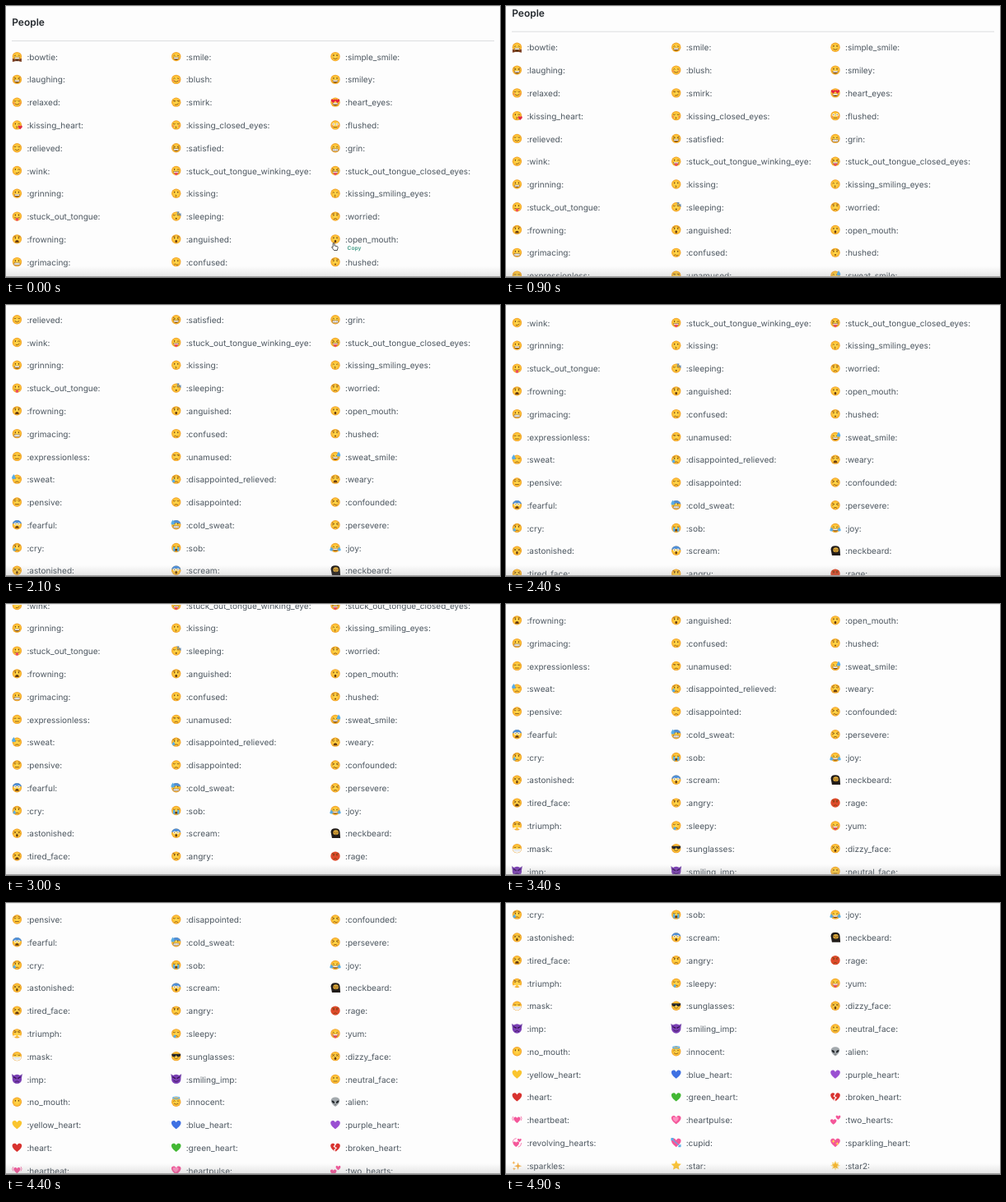
Animation of 600x330 px, one loop 5 s. Source, as an HTML page:

```html
<!DOCTYPE html>
<html lang="en">
<head>
<meta charset="utf-8">
<title>Emoji list</title>
<style>
  html, body { margin: 0; width: 100%; height: 100%; overflow: hidden; background: #fdfdfd; }
  svg { display: block; width: 600px; height: 330px; font: 10.06px Inter, sans-serif; text-rendering: geometricPrecision; }
  text { fill: #4c565f; }
  .title { font-size: 12px; font-weight: 600; fill: #24292e; }
  .copy { font-size: 6.6px; font-weight: 600; fill: #3f9a85; }
  .icon { fill: none; stroke: #74430f; stroke-width: 1.3; stroke-linecap: round; stroke-linejoin: round; }
</style>
</head>
<body>
<svg viewBox="0 0 600 330">
  <defs>
    <radialGradient id="skin">
      <stop offset=".2" stop-color="#ffd54a"/><stop offset=".75" stop-color="#fdc035"/><stop offset="1" stop-color="#ee9a24"/>
    </radialGradient>
    <linearGradient id="shade" x2="0" y2="1">
      <stop stop-color="#888" stop-opacity="0"/><stop offset="1" stop-color="#888" stop-opacity=".2"/>
    </linearGradient>
  </defs>
  <g id="page">
    <text class="title" x="7.2" y="24.2">People</text>
    <path d="M7 42.5H593" stroke="#dcdee0"/>
  </g>
  <g id="pointer">
    <text class="copy" x="414.6" y="297.4">Copy</text>
    <path d="M397.2 292.5v-3.6q.9-1.4 1.8 0v3l3.4 .9q1 .4 .7 1.6l-.8 3.1h-3.9l-2.7-3.6q.2-1.4 1.5-.4z"
      fill="#fff" stroke="#222" stroke-width=".8"/>
  </g>
  <path d="M0 .5H600" stroke="#ececec"/>
  <path d="M0 317H600V329H0z" fill="url(#shade)"/>
  <path d="M0 329.5H600" stroke="#a2a2a2"/>
</svg>
<script>
const ROW = 27.78, TOP = 62, COL = 193.3, LOOP = 5000, STEP = 100;
const BROWN = '#6b3d10', PINK = '#f4579a', BLUE = '#5aaee6';

const line = (d, attrs = '') => `<path d="${d}" ${attrs}/>`;
const shape = (d, color) => line(d, `fill="${color}" stroke="none"`);
const oval = (x, y, rx, ry, color) =>
  `<ellipse cx="${x}" cy="${y}" rx="${rx}" ry="${ry}" fill="${color}" stroke="none"/>`;
const pair = (x, y, rx, ry, color) => oval(-x, y, rx, ry, color) + oval(x, y, rx, ry, color);
const at = (x, y, size, body) => `<g transform="translate(${x} ${y}) scale(${size})">${body}</g>`;
const heart = (color, x = 0, y = 0, size = 1) =>
  at(x, y, size, shape('M0 9C-5 5-10 1-10-4C-10-9-3-11 0-5C3-11 10-9 10-4C10 1 5 5 0 9z', color));
const drop = (x, y, size = 1) => at(x, y, size, shape('M0-4q6 8 0 8t0-8z', BLUE));

function star(color, points, inner, x = 0, y = 0, size = 10) {
  let d = '';
  for (let i = 0; i < points * 2; i++) {
    const r = i % 2 ? size * inner : size, a = i * Math.PI / points;
    d += `${i ? 'L' : 'M'}${(x + r * Math.sin(a)).toFixed(2)} ${(y - r * Math.cos(a)).toFixed(2)}`;
  }
  return shape(d + 'z', color);
}

const face = (color = 'url(#skin)') => oval(0, 0, 9.8, 9.8, color);
const grin = shape('M-6 1.5h12q-.8 5.5-6 5.5t-6-5.5z', BROWN) + shape('M-5.2 2h10.4l-1 2.6h-8.4z', '#fff');
const tongue = shape('M-2.8 4h5.6v3.5q-2.8 4.5-5.6 0z', '#ef4a63');

// One character per feature: eyes, mouth, then extras.
const parts = {
  o: pair(3.5, -2.5, 1.1, 1.8, BROWN),
  '^': line('M-5.5-1.5q1.7-3 3.4 0M2.1-1.5q1.7-3 3.4 0'),
  u: line('M-6-2.5q2 2 4 0M2-2.5q2 2 4 0'),
  w: oval(-3.5, -2.5, 1.1, 1.8, BROWN) + line('M2-2q2-2.5 4 0'),
  '-': line('M-6-2h4M2-2h4'),
  s: line('M-6-3h4M2-3h4M-2.8-2v.8M5.2-2v.8'),
  x: line('M-6-4l4 2-4 2M6-4l-4 2 4 2'),
  X: line('M-6-4l4 4m0-4l-4 4M2-4l4 4m0-4l-4 4'),
  e: pair(3.7, -2, 2.6, 2.8, '#fff') + pair(3.7, -2, 1, 1.1, BROWN),
  h: heart('#e5253c', -4.5, -2.5, .45) + heart('#e5253c', 4.5, -2.5, .45),
  g: shape('M-9.5-5h19q0 6.5-5 6.5q-3.5 0-4.5-4q-1 4-4.5 4q-5 0-5-6.5z', '#26262a'),
  D: grin,
  m: line('M-4 3.6q4 3.4 8 0'),
  f: line('M-3.2 5.8q3.2-3 6.4 0'),
  _: line('M-3.5 4.5h7'),
  '.': oval(0, 4.8, 1.5, 1.7, BROWN),
  O: oval(0, 4.4, 2.3, 3, BROWN),
  T: grin + tongue,
  l: line('M-5 3q5 2 10 0') + tongue,
  G: line('M-5.5 2h11q1.5 2.4 0 4.8h-11q-1.5-2.4 0-4.8z', 'fill="#fff" stroke-width=".8"') +
     line('M-6 4.4h12M-2.5 2v5M2.5 2v5', 'stroke="#999" stroke-width=".6"'),
  k: line('M-1 2.8q2.8 .9 0 1.9q2.8 .9 0 1.9'),
  S: line('M-2 5.5q5 0 6.5-2.5'),
  z: line('M-4 5.5q2-2.5 4 0t4 0'),
  W: shape('M-4 7q0-5 4-5t4 5z', BROWN),
  b: pair(6.2, 2.2, 2, 1.5, '#f5845a'),
  t: drop(-5.5, 3),
  q: shape('M-6.5-1h4v9.5l-4-2zM2.5-1h4v7.5l-4 2z', BLUE),
  j: drop(-8.2, 2.5, 1.1) + drop(8.2, 2.5, 1.1),
  d: drop(-7, -5.5, 1.3),
  c: drop(7, -5, 1.3),
  B: shape('M-9.6-2A9.8 9.8 0 0 1 9.6-2Q0-6-9.6-2z', '#4f8fd8'),
  v: heart('#e02a41', 6.5, 5, .45),
  Z: line('M2-9h4l-4 4h4M7-5h3l-3 3h3', 'stroke="#3a78bd"'),
  N: oval(-3, 6, 2.6, 3.2, BLUE),
  H: line('M-7-8.5a7 2.2 0 1 1 14 0a7 2.2 0 1 1-14 0z', `stroke="${BLUE}" stroke-width="2"`),
  M: shape('M-9 0Q0 3 9 0Q9 8 0 9.4Q-9 8-9 0z', '#f3f5f7') + line('M-6 4h12', 'stroke="#c9d0d6" stroke-width="1"'),
  n: shape('M-1 4q-8-1-9 4q5 3 9-4zM1 4q8-1 9 4q-5 3-9-4z', '#fff3df'),
  r: line('M-6.5-6l4.5 2M6.5-6L2-4'),
  a: line('M-6.5-4.8l4-1.6M6.5-4.8l-4-1.6', 'stroke-width="1"'),
  y: shape('M0 7.5L-9.5 3.6v7.6L0 8.8L9.5 11.2V3.6z', '#7a3d20') + oval(0, 7.8, 1.8, 1.8, '#3c2a22')
};

const devil = mouth => shape('M-9.5-1L-11-11Q-8-7-3-8zM9.5-1L11-11Q8-7 3-8z', '#6a36a3') + face('#7b3fb4') +
  line('M-6.5-4l4.5 2.5M6.5-4L2-1.5', 'stroke="#32104f" stroke-width="2.2"') +
  line(mouth, 'stroke="#32104f"');

const special = {
  imp: devil('M-4 6q4-4 8 0'),
  smiling_imp: devil('M-5 3q5 5 10 0'),
  rage: face('#dd4a2a') + parts.r + parts.o + parts.f,
  neckbeard: shape('M-9.5-3Q-9-10.5 0-10.5Q9-10.5 9.5-3L10.5 10H-7Q-8 4-9.5-3z', '#211c19') +
    oval(1, -1.8, 5.8, 5, '#dfae3c') + line('M-4-2.2h4M2-2.2h4M-1 1.5h4') +
    shape('M-4.5 3q5.5 3.5 11 0q-1 5-5.5 5t-5.5-5z', '#211c19'),
  alien: shape('M0 10C-5 7-9 2-9-3C-9-12 9-12 9-3C9 2 5 7 0 10z', '#a3a9ad') +
    shape('M-7.5-3q6 0 6 6q-6 0-6-6zM7.5-3q-6 0-6 6q6 0 6-6z', '#202428') +
    line('M-1.5 6h3', 'stroke="#444" stroke-width="1"'),
  yellow_heart: heart('#fac52f'),
  blue_heart: heart('#3f71e3'),
  purple_heart: heart('#9a50d2'),
  heart: heart('#d8322f'),
  green_heart: heart('#43b834'),
  broken_heart: heart('#d8322f') + line('M0-6l-3 4 5 3-4 4 2 4', 'stroke="#fff" stroke-width="2"'),
  heartbeat: heart(PINK, 0, 0, .72) + line('M-8.5-7q-3 4 0 8M8.5-7q3 4 0 8', `stroke="${PINK}"`),
  heartpulse: heart(PINK) + heart('#ff8fc0', -1, -1, .6),
  two_hearts: heart(PINK, -4, 4, .65) + heart(PINK, 6, -5, .5),
  revolving_hearts: heart(PINK, -2, 3, .65) + heart(PINK, 5, -5, .42) +
    line('M-9-1q0-7 7-8M9 1q0 7-6 8', `stroke="${PINK}"`),
  cupid: heart(PINK) + line('M-9-8L9 8M9 4v4h-4M-10-5v-4h4', `stroke="${BLUE}" stroke-width="2"`),
  sparkling_heart: heart(PINK) + star('#ffd84a', 4, .4, -4, -3, 4) + star('#ffd84a', 4, .4, 4, 2, 4),
  sparkles: star('#f3a83b', 4, .3, 2, 1, 8) + star('#f3a83b', 4, .3, -7, -6, 4) + star('#f3a83b', 4, .3, -6, 7, 3.5),
  star: star('#fbc436', 5, .48, 0, 0, 11),
  star2: star('#f7dc8b', 8, .55, 0, 0, 10.5) + star('#f6b52d', 5, .48, 0, 0, 7.5)
};

const list = `bowtie=^Dy smile=^D simple_smile=om laughing=xD blush=^mb smiley=oD
relaxed=umb smirk=sS heart_eyes=hD kissing_heart=wkv kissing_closed_eyes=ukb flushed=e_b
relieved=um satisfied=xD grin=^G wink=wS stuck_out_tongue_winking_eye=wT stuck_out_tongue_closed_eyes=xT
grinning=oD kissing=ok kissing_smiling_eyes=^k stuck_out_tongue=ol sleeping=u.Z worried=oaf
frowning=oaW anguished=oaO open_mouth=oO grimacing=oG confused=oz hushed=oa.
expressionless=-_ unamused=sf sweat_smile=^Dc sweat=ufd disappointed_relieved=oaft weary=uaW
pensive=u_a disappointed=uf confounded=xz fearful=BeW cold_sweat=BoGd persevere=xf
cry=oaft sob=uWq joy=^Dj astonished=XO scream=BeO neckbeard
tired_face=xW angry=orf rage triumph=urn sleepy=ufN yum=^Tb
mask=uM sunglasses=gm dizzy_face=XO imp smiling_imp neutral_face=o_
no_mouth=o innocent=^mH alien yellow_heart blue_heart purple_heart
heart green_heart broken_heart heartbeat heartpulse two_hearts
revolving_hearts cupid sparkling_heart sparkles star star2`;

const page = document.getElementById('page'), pointer = document.getElementById('pointer');

page.innerHTML += list.split(/\s+/).map((item, i) => {
  const [name, code] = item.split('=');
  const x = i % 3 * COL, y = TOP + Math.floor(i / 3) * ROW;
  const art = code ? face() + [...code].map(c => parts[c]).join('') : special[name];
  return `<g class="icon" transform="translate(${x + 13.4} ${y - .4}) scale(.58)">${art}</g>` +
    `<text x="${x + 25.4}" y="${y + 3.7}">:${name}:</text>`;
}).join('');

// Scroll position as [step, pixels]: a series of flicks that slow down.
const flicks = [[8, 0], [9, 11.3], [10, 37], [11, 59], [12, 74], [13, 85], [15, 98.5], [18, 109], [19, 120],
  [20, 140], [21, 155], [22, 166], [24, 179], [28, 195], [32, 203], [33, 232], [34, 264], [35, 278],
  [37, 296], [39, 304.8], [41, 314], [42, 334], [43, 358], [45, 392], [47, 420], [49, 436.4]];

function scrollAt(step) {
  const i = flicks.findIndex(([s]) => s >= step);
  if (i < 1) return 0;
  const [s0, y0] = flicks[i - 1], [s1, y1] = flicks[i];
  return y0 + (y1 - y0) * (step - s0) / (s1 - s0);
}

function draw(now) {
  const step = Math.floor(now % LOOP / STEP);
  page.setAttribute('transform', `translate(0 ${-scrollAt(step)})`);
  pointer.setAttribute('opacity', Math.max(0, 1 - step / 3));
  requestAnimationFrame(draw);
}
requestAnimationFrame(draw);
</script>
</body>
</html>
```
